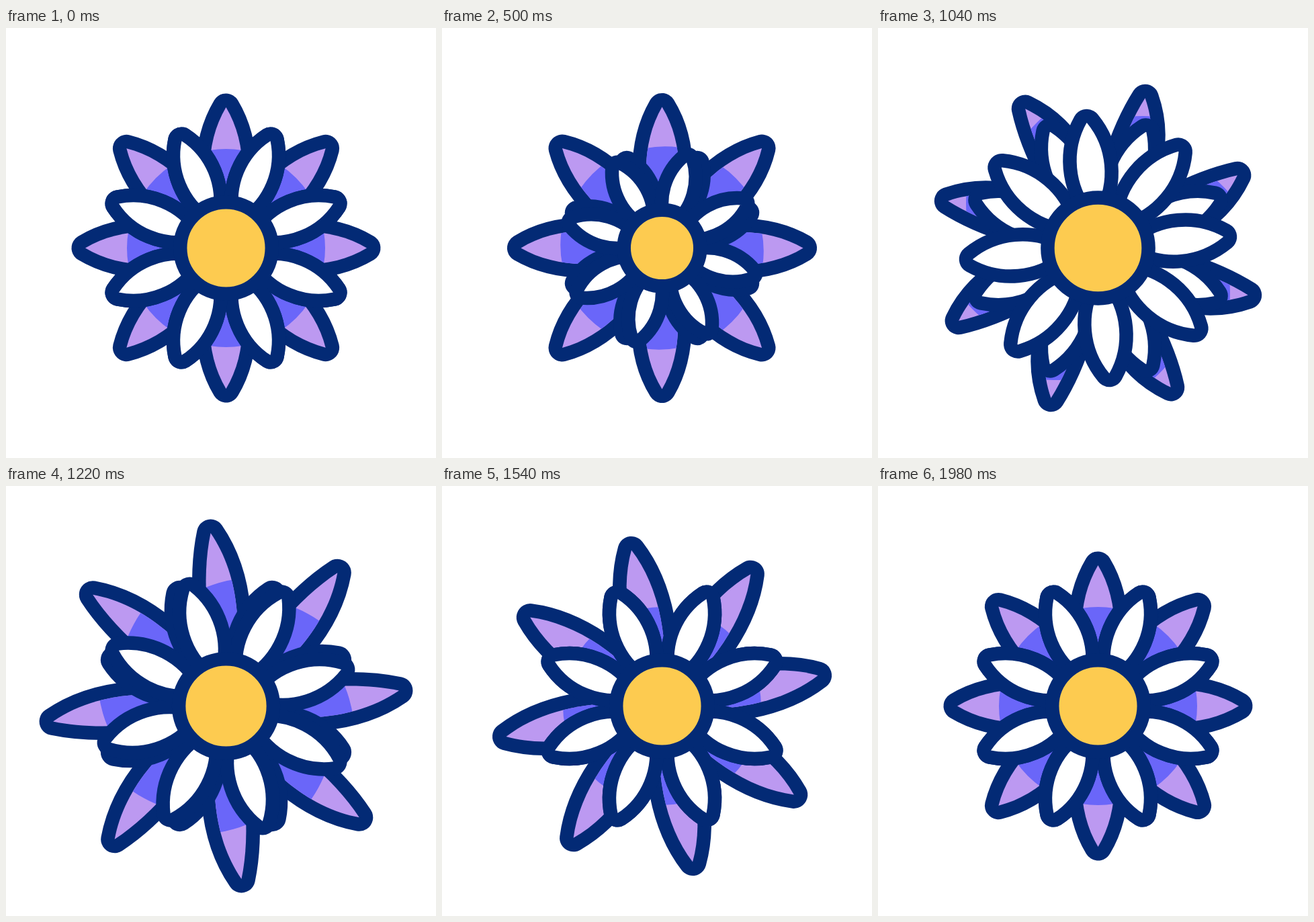
These frames come from a looping animation (640x640 px, 2.3 s). An HTML page with a canvas:

```html
<!DOCTYPE html>
<html>
<head>
<meta charset="utf-8">
<style>
  html, body { margin: 0; height: 100%; overflow: hidden; background: #fff; }
  canvas { display: block; width: 640px; height: 640px; }
</style>
</head>
<body>
<canvas width="640" height="640"></canvas>
<script>
const ctx = document.querySelector('canvas').getContext('2d');
const LOOP = 2300, CENTER = 327.5, LINE = 20.5, PAD = 10;
const NAVY = '#032a75', YELLOW = '#fdcb50', LILAC = '#bc99f1', BLUE = '#6a66f9', WHITE = '#fff';

const progress = (t, from, to) => Math.min(1, Math.max(0, (t - from) / (to - from)));
const smooth = u => u * u * (3 - 2 * u);
const cubic = u => u < .5 ? 4 * u ** 3 : 1 - 4 * (1 - u) ** 3;
const quarterTurn = (t, from, to) => Math.PI / 2 * cubic(progress(t, from, to));

// Rest, first extreme, second extreme and so on, joined by smooth steps
function swing(t, rest, ...stops) {
  let value = rest, from = 0;
  for (const [to, next] of stops) {
    value += (next - value) * smooth(progress(t, from, to));
    from = to;
  }
  return value;
}

// Petal from the centre along the x axis; bend pushes its middle sideways
function lilacPath(length, width, bend) {
  const a = length * .38, b = length * .74, c = width * 4 / 3;
  ctx.beginPath();
  ctx.moveTo(0, 0);
  ctx.bezierCurveTo(a, bend - c, b, bend - c, length, 0);
  ctx.bezierCurveTo(b, bend + c, a, bend + c, 0, 0);
  ctx.closePath();
}

// Lens of two arcs grown by PAD; scaling leaves the line width alone
function whitePath(start, end, width, scale) {
  const mid = (start + end) / 2, half = (end - start) / 2;
  const radius = (half * half + width * width) / (2 * width);
  const offset = radius - width, a = Math.asin(half / radius), q = Math.PI / 2;
  ctx.save();
  ctx.scale(scale, scale);
  ctx.beginPath();
  ctx.arc(mid, offset, radius + PAD, -q - a, -q + a);
  ctx.arc(end, 0, PAD, -q + a, q - a);
  ctx.arc(mid, -offset, radius + PAD, q - a, q + a);
  ctx.arc(start, 0, PAD, q + a, 3 * q - a);
  ctx.closePath();
  ctx.restore();
}

function disc(x, y, radius) {
  ctx.beginPath();
  ctx.arc(x, y, radius, 0, 2 * Math.PI);
}

function fill(color) {
  ctx.fillStyle = color;
  ctx.fill();
}

function stroke(width) {
  ctx.lineWidth = width;
  ctx.stroke();
}

function ring(turn, drawPetal) {
  for (let i = 0; i < 8; i++) {
    ctx.save();
    ctx.rotate(turn + i * Math.PI / 4);
    drawPetal();
    ctx.restore();
  }
}

function draw(t) {
  const tip = swing(t, 209.5, [280, 258], [710, 166], [1210, 258.5], [1920, 209.5]);
  const scale = swing(t, 1, [280, .63], [840, 1.1], [1500, 1]);
  const core = swing(t, 58.3, [280, 28.5], [760, 70], [1390, 58.3]);
  const blue = swing(t, 147.5, [280, 135], [1000, 207], [1500, 147.5]);
  const drag = Math.max(0, blue - 147.5);

  ctx.setTransform(1, 0, 0, 1, 0, 0);
  ctx.fillStyle = WHITE;
  ctx.fillRect(0, 0, 640, 640);
  ctx.translate(CENTER, CENTER);
  ctx.strokeStyle = NAVY;
  ctx.lineJoin = 'round';

  ring(quarterTurn(t, 475, 2028), () => {
    lilacPath(tip, 35.4 - tip * .052, drag * .25);
    stroke(2 * LINE);
    fill(LILAC);
    ctx.clip();
    disc(0, drag * 1.2, Math.hypot(blue, drag * 1.2));
    fill(BLUE);
  });

  for (const turn of [0, -quarterTurn(t, 125, 1565)]) {
    ring(Math.PI / 8 + turn, () => {
      whitePath(53, 173, 18.5, scale);
      fill(WHITE);
      stroke(LINE);
    });
  }

  disc(0, 0, core + PAD);
  fill(YELLOW);
  stroke(LINE);
}

const begin = performance.now();
function frame() {
  draw((performance.now() - begin) % LOOP);
  requestAnimationFrame(frame);
}
frame();
</script>
</body>
</html>
```
